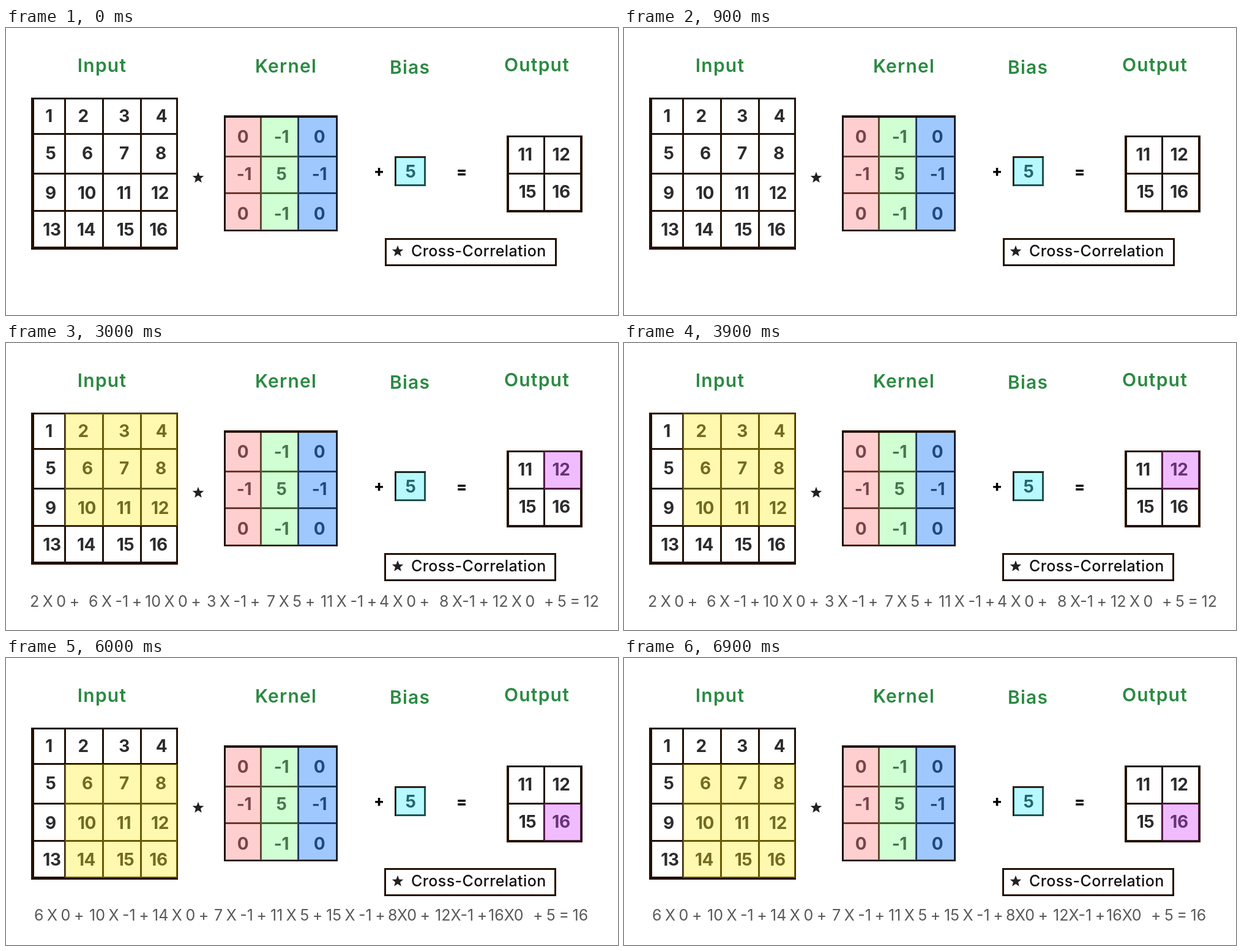
Recreate the animation shown at these times as an HTML page. Size 1000 by 470 pixels, loop 7.5 s.

```html
<!DOCTYPE html>
<html lang="en">
<head>
<meta charset="utf-8">
<title>Cross-correlation with bias</title>
<style>
  html, body { margin: 0; width: 100%; height: 100%; overflow: hidden; background: #fff; }
  svg { display: block; width: 1000px; height: 470px; font-family: Inter, "Open Sans", sans-serif; }
  text { white-space: pre; }
  .title { font-size: 30px; font-weight: 600; letter-spacing: 1.2px; fill: #2b8a42; text-anchor: middle; }
  .num { font-size: 28px; font-weight: 700; letter-spacing: -.4px; fill: #2c2c2f; text-anchor: middle; }
  .op { font-size: 25px; font-weight: 800; fill: #000; text-anchor: middle; }
  .legend { font-size: 25px; font-weight: 500; letter-spacing: .4px; fill: #111; }
  .sum { font-size: 25px; font-weight: 400; word-spacing: -1.5px; fill: #58595b; }
  .line { fill: none; stroke: #221104; }
  .star { fill: #222; }
</style>
</head>
<body>
<svg id="stage" viewBox="0 0 1000 470"></svg>
<script>
const STEP = 1500, PHASES = 5;
const YELLOW = 'rgba(255,236,15,.33)', PURPLE = 'rgba(211,63,255,.35)';
const stage = document.getElementById('stage');

function add(parent, tag, attrs, content = '') {
  const node = document.createElementNS('http://www.w3.org/2000/svg', tag);
  for (const key in attrs) node.setAttribute(key, attrs[key]);
  node.textContent = content;
  return parent.appendChild(node);
}

const label = (cls, content, x, y, parent = stage) =>
  add(parent, 'text', { class: cls, x, y }, content);

const line = (d, width = 3) =>
  add(stage, 'path', { class: 'line', d, 'stroke-width': width });

// Fills the area between two corners.
const box = (fill, x1, y1, x2, y2, parent = stage) =>
  add(parent, 'rect', { x: x1, y: y1, width: x2 - x1, height: y2 - y1, fill });

function star(cx, cy, r = 9.8) {
  const points = Array.from({ length: 10 }, (_, i) => {
    const a = i * Math.PI / 5 - Math.PI / 2, d = i % 2 ? r * .43 : r;
    return `${(cx + d * Math.cos(a)).toFixed(2)},${(cy + d * Math.sin(a)).toFixed(2)}`;
  });
  add(stage, 'polygon', { class: 'star', points: points.join(' ') });
}

// Each row: centre y, then pairs of value and centre x.
function numbers(rows) {
  for (const [y, ...cells] of rows)
    for (const [value, x] of cells) label('num', value, x, y + 10);
}

label('title', 'Input', 157, 72);
label('title', 'Kernel', 457.5, 73);
label('title', 'Bias', 660, 75);
label('title', 'Output', 867.5, 71);

// Input
line('M41 115.5H281M45 173.5H280M45 238.5H280M45 299.5H280M96.5 115V360M158.5 115V360M220.5 115V360M279.5 114V362');
line('M43.5 114V363', 5);
line('M41 360.5H281', 5);
numbers([
  [144, [1, 70], [2, 126], [3, 193], [4, 254]],
  [205, [5, 73], [6, 133], [7, 193], [8, 253]],
  [270, [9, 73], [10, 132], [11, 192.5], [12, 251.5]],
  [330, [13, 75], [14, 131], [15, 195], [16, 249]]
]);

// Kernel
line('M358 210.5H541M358 270.5H541M416.5 145V332M477.5 145V332M540.5 143V333M356 331.5H542');
line('M357.5 144V333', 3);
line('M356 145H542', 4);
numbers([
  [178, ['0', 387], ['-1', 450], ['0', 512]],
  [239, ['-1', 389], ['5', 450], ['-1', 512]],
  [304, ['0', 387], ['-1', 450], ['0', 512]]
]);
box('rgba(255,117,117,.35)', 359, 147, 416, 331);
box('rgba(121,255,132,.35)', 416, 147, 477, 331);
box('rgba(15,117,255,.4)', 477, 147, 540, 331);

// Bias
line('M636.5 211.5H684.5V257.5H636.5Z');
numbers([[235, [5, 661]]]);
box('rgba(20,236,255,.3)', 637, 212, 686, 259);

// Output
line('M818 177.5H942M820 238.5H940M879.5 178V300');
line('M820 176V302M940 176V302M818 300H942', 4);
numbers([
  [207, [11, 848], [12, 907]],
  [268, [15, 852], [16, 907]]
]);

star(314, 245.3);
label('op', '+', 609.5, 242.5);
label('op', '=', 744.5, 243.5);

star(640, 365.8);
label('legend', 'Cross-Correlation', 662, 374);

// Each sum: baseline, then its terms with their left edges.
const sums = [
  [435, ['1 X 0 +', 45], ['5 X -1 +', 136], ['9 X 0', 227], ['+ 2 X -1 +', 303], ['6 X 5 +', 422],
    ['10 X -1 +', 511], ['3 X 0 +', 613], ['7 X -1 +', 709], ['11 X 0', 801], ['+ 5 = 11', 881]],
  [432, ['2 X 0 +', 40], ['6 X -1 +', 136], ['10 X 0 +', 228], ['3 X -1 +', 329], ['7 X 5 +', 427],
    ['11 X -1 +', 515], ['4 X 0 +', 611], ['8 X-1 +', 709], ['12 X 0', 796], ['+ 5 = 12', 880]],
  [429, ['5 X 0 +', 38], ['9 X -1 +', 134], ['13 X 0 +', 226], ['6 X -1 +', 325], ['10 X 5 +', 417],
    ['14 X -1 +', 515], ['7 X 0 +', 618], ['11 X -1 +', 709], ['15 X 0', 804], ['+ 5 = 15', 889]],
  [430, ['6 X 0 +', 47], ['10 X -1 +', 137], ['14 X 0 +', 240], ['7 X -1 +', 341], ['11 X 5 +', 433],
    ['15 X -1 +', 524], ['8X0 +', 625], ['12X-1 +', 702], ['16X0', 789], ['+ 5 = 16', 862]]
];

function drawWindow(group, index) {
  const right = index % 2, low = index > 1;
  box(YELLOW, right ? 96 : 44, low ? 174 : 115, right ? 280 : 227, low ? 360 : 299, group);
  box(PURPLE, right ? 879 : 820, low ? 238 : 177, right ? 939 : 880, low ? 299 : 239, group);
  const [y, ...terms] = sums[index];
  for (const [content, x] of terms) label('sum', content, x - 1, y, group);
}

for (let phase = 0; phase < PHASES; phase++) {
  const group = add(stage, 'g', { opacity: phase ? 0 : 1 });
  add(group, 'rect', { class: 'line', x: phase ? 619.5 : 620.5, y: 345.5, width: 278, height: 43, 'stroke-width': 3 });
  if (phase) drawWindow(group, phase - 1);

  const frames = Array.from({ length: PHASES + 1 }, (_, i) => ({
    opacity: i % PHASES === phase ? 1 : 0, offset: i / PHASES, easing: 'step-end'
  }));
  group.animate(frames, { duration: STEP * PHASES, iterations: Infinity });
}
</script>
</body>
</html>
```
